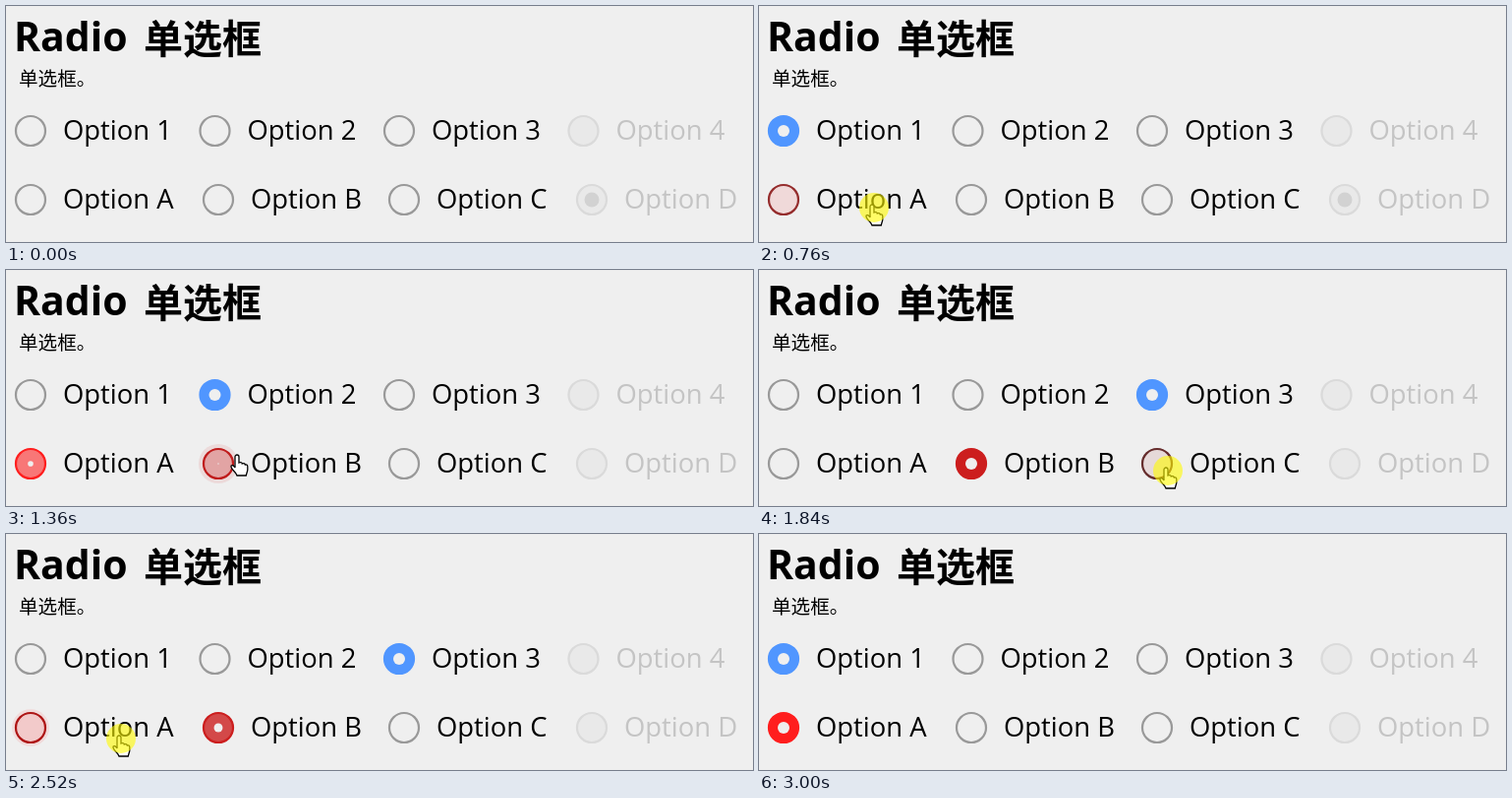
An HTML page that plays this animation: 760 px wide and 240 px high, repeating every 3.08 s.

```html
<!DOCTYPE html>
<html lang="zh">
<meta charset="utf-8">
<style>
  html, body { margin: 0; width: 100%; height: 100%; overflow: hidden; background: #efefef; }
  svg { display: block; }
  text { font-family: "Open Sans", "Noto Sans", sans-serif; font-size: 27.4px; }
  .cjk { font-family: "Noto Sans CJK SC", "Noto Sans CJK", sans-serif; font-size: 19.6px; }
  .title { font-size: 41px; font-weight: 700; }
  .cjk.title { font-size: 40px; }
</style>
<svg width="760" height="240">
  <text class="title" x="8" y="46">Radio</text>
  <text class="cjk title" x="140" y="48">单选框</text>
  <text class="cjk" x="13" y="80.5">单选框。</text>
  <g id="labels"></g>
  <g id="live"></g>
</svg>
<script>
const LOOP = 3080, TICK = 40, PRESS = 80, FADE = 160, TRAVEL = 280;
const GREY = [153, 153, 153], BLUE = [80, 150, 255];

const rows = [
  { y: 127, names: '1234', initial: -1, x: i => 25 + 187.5 * i, color: () => BLUE },
  { y: 197, names: 'ABCD', initial: 3, x: i => 25 + 190 * i + (i % 2),
    color: i => [255 - 51 * i, 30, 30] }
];

// pointer stops; those with a row are clicks on one of its options
const stops = [
  { t: 80, x: 120, y: 236 },
  { t: 600, x: 135, y: 125, row: 0, option: 0 },
  { t: 760, x: 117, y: 205, row: 1, option: 0 },
  { t: 1160, x: 232, y: 129, row: 0, option: 1 },
  { t: 1280, x: 237, y: 191, row: 1, option: 1 },
  { t: 1680, x: 403, y: 121, row: 0, option: 2 },
  { t: 1840, x: 416, y: 204, row: 1, option: 2 },
  { t: 2160, x: 257, y: 204, row: 1, option: 1 },
  { t: 2480, x: 117, y: 208, row: 1, option: 0 },
  { t: 2760, x: 136, y: 123, row: 0, option: 0 }
];
rows.forEach((row, n) =>
  row.clicks = [{ t: -LOOP, option: row.initial }, ...stops.filter(s => s.row === n)]);

const clamp = v => Math.max(0, Math.min(1, v));
const lerp = (a, b, k) => a + (b - a) * k;
const mix = (a, b, k) => a.map((v, i) => lerp(v, b[i], k));
const rgb = c => `rgb(${c.map(Math.round)})`;
const circle = (x, y, r, fill, more = '') => `<circle cx="${x}" cy="${y}" r="${r}" fill="${fill}" ${more}/>`;
const ring = color => `stroke="${color}" stroke-width="2.2"`;
const each = draw => rows.map(row => [0, 1, 2, 3].map(i => draw(row, i)).join('')).join('');

function radio(row, i, t) {
  const { y, clicks } = row, x = row.x(i);
  const now = clicks.findLastIndex(c => c.t <= t);
  const dt = t - clicks[now].t;
  const active = clicks[now].option === i;
  const leaving = clicks[now - 1]?.option === i;
  const p = active ? clamp(dt / FADE) ** 1.8 : leaving ? clamp(1 - dt / FADE) ** .8 : 0;

  if (i === 3)
    return circle(x, y, 15, '#e9e9e9', ring('#dadada')) + circle(x, y, 7.5 * p, '#d2d2d2');

  const color = row.color(i);
  const next = clicks.find(c => c.option === i && t >= c.t - PRESS && t < c.t + FADE);
  const hover = next ? clamp((t - next.t + PRESS) / 100) : 0;
  const idle = mix(GREY, color.map(v => v * .58), hover);
  const halo = active && dt < FADE
    ? circle(x, y, 16 + 4 * Math.sin(Math.PI * dt / FADE), rgb(color), 'fill-opacity=".1"') : '';
  return halo +
    circle(x, y, 15, rgb(color), `fill-opacity="${p}" ` + ring(rgb(mix(idle, color, clamp(3 * p))))) +
    circle(x, y, 7.5 * clamp(p - .2), '#efefef');
}

// rests for one press, then glides to the next stop
function pointer(t) {
  const k = stops.findLastIndex(s => s.t + PRESS <= t);
  if (k < 0 || t >= stops.at(-1).t + FADE) return '';
  const a = stops[k], b = stops[k + 1] || a;
  const move = clamp((t - a.t - PRESS) / Math.min(TRAVEL, b.t - a.t - PRESS));
  const x = lerp(a.x, b.x, move), y = lerp(a.y, b.y, move);
  const pressed = t >= b.t && t < b.t + PRESS;
  return `<path transform="translate(${x - 2} ${y - 3})" fill="#fff" stroke="#000" stroke-width="1.3"
    d="M-2 13V2a2 2 0 0 1 4 0V8c2-1 3.3 0 3.3 1 2-.8 3 0 3 1 1.8-.5 2.5.4 2.5 2V15c0 2-1 3-1.5 6H0c-.6-2-2-3.5-4-5.5-1-1.5-2.5-3-2-4.3 1.2-1.4 3-.2 4 1.8z"/>` +
    (pressed ? circle(x, y, 15, '#fffa00', 'fill-opacity=".6"') : '');
}

labels.innerHTML = each((row, i) =>
  `<text x="${row.x(i) + 33}" y="${row.y + 8.5}" fill="${i === 3 ? '#c4c4c4' : '#000'}">Option ${row.names[i]}</text>`);

const start = performance.now();
function loop() {
  const t = Math.floor((performance.now() - start) % LOOP / TICK) * TICK;
  live.innerHTML = each((row, i) => radio(row, i, t)) + pointer(t);
  requestAnimationFrame(loop);
}
loop();
</script>
</html>
```
